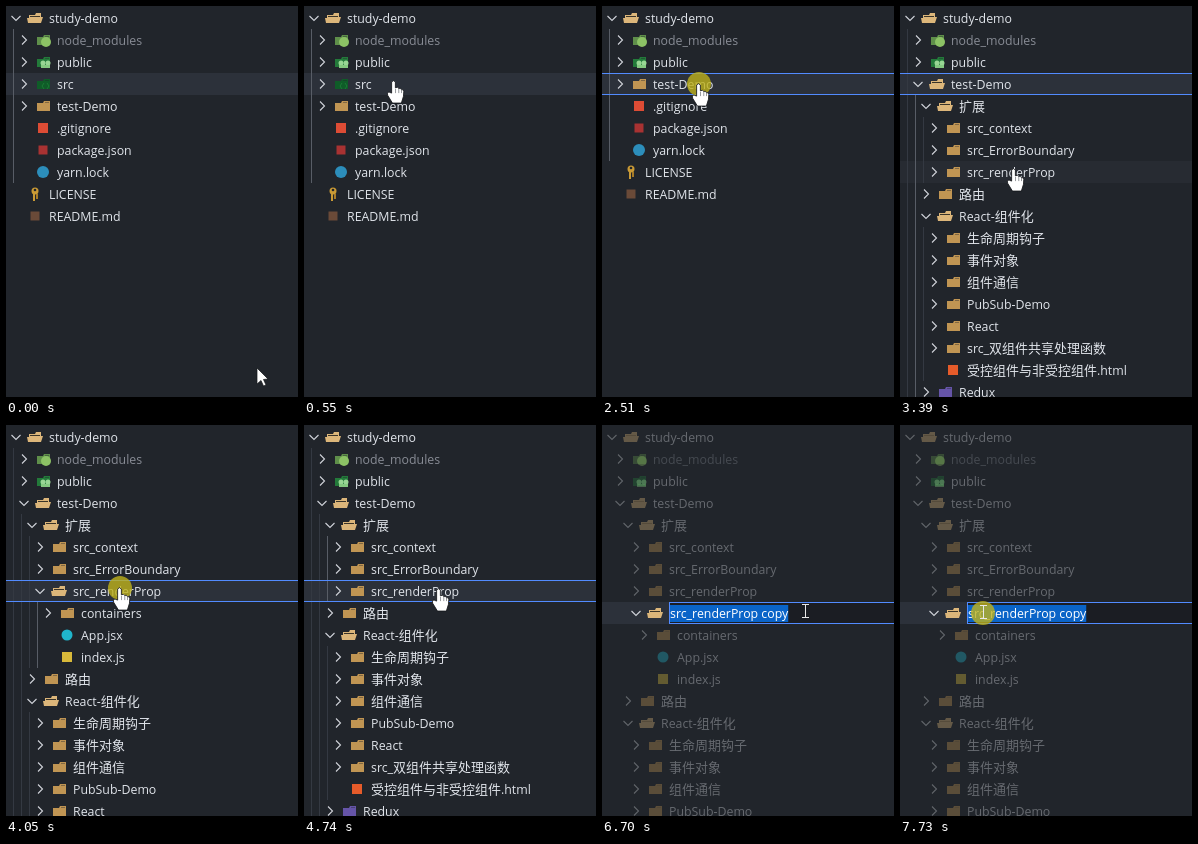
An HTML page with a canvas that plays this animation: 292 px wide and 391 px high, repeating every 8 s.

```html
<!DOCTYPE html>
<html lang="en">
<head>
<meta charset="utf-8">
<title>File explorer</title>
<style>
html, body { margin: 0; width: 100%; height: 100%; overflow: hidden; background: #21252b; }
canvas { display: block; width: 292px; height: 391px; }
</style>
</head>
<body>
<canvas id="stage"></canvas>
<script>
const W = 292, H = 391, ROW = 22, LOOP = 8000;
const canvas = document.getElementById('stage');
const ratio = window.devicePixelRatio || 1;
canvas.width = W * ratio;
canvas.height = H * ratio;
const c = canvas.getContext('2d');
c.scale(ratio, ratio);

const LATIN = "12.35px 'Open Sans', 'Noto Sans', sans-serif";
const CJK = "13px 'Noto Sans CJK SC', 'Noto Sans CJK', 'Noto Sans CJK JP', sans-serif";
const TAN = '#c09553', FOCUS = '#528bff';

// Times at which the tree changes
const T = {
  srcOpen: 820, srcShut: 1090, srcGone: 1740, demoOpen: 2640,
  propOpen: 3920, propShut: 4460, paste: 5550, copyOpen: 5890, rename: 6240
};
const between = (t, a, b) => t >= a && t < b;

// Pointer path: time, x, y of its hot spot
const PATH = [
  [0, 251, 362], [70, 251, 362], [550, 90, 74], [750, 90, 74], [950, 89, 76],
  [1150, 89, 76], [1230, 93, 31], [1410, 93, 31], [1480, 108, 38], [1740, 108, 38],
  [1880, 112, 44], [2160, 112, 46], [2440, 97, 77], [2640, 97, 77], [2920, 101, 92],
  [2990, 101, 93], [3390, 114, 162], [4390, 114, 162], [4740, 135, 163],
  [5270, 135, 163], [5750, 137, 183], [6100, 137, 183], [6630, 203, 186],
  [6770, 203, 186], [6840, 211, 187], [7040, 211, 187], [7440, 83, 187], [8000, 83, 187]
];
const CLICKS = [[750, 950], [2440, 2710], [3850, 4120], [4390, 4600], [5820, 6030], [7590, 8100]];

function pointer(t) {
  let i = 0;
  while (i < PATH.length - 2 && t >= PATH[i + 1][0]) i++;
  const [a, x0, y0] = PATH[i], [b, x1, y1] = PATH[i + 1];
  const p = Math.min(1, (t - a) / (b - a)), e = p * p * (3 - 2 * p);
  return [x0 + (x1 - x0) * e, y0 + (y1 - y0) * e];
}

function rowsAt(t) {
  const rows = [];
  const dir = (depth, name, open = false, icon = 'folder') => rows.push({ depth, name, open, icon, dir: true });
  const file = (depth, name, icon) => rows.push({ depth, name, icon });
  const parts = depth => {
    dir(depth, 'containers');
    file(depth, 'App.jsx', 'react');
    file(depth, 'index.js', 'js');
  };
  dir(0, 'study-demo', true);
  dir(1, 'node_modules', false, 'modules');
  dir(1, 'public', false, 'public');
  if (t < T.srcGone) {
    const open = between(t, T.srcOpen, T.srcShut);
    dir(1, 'src', open, 'src');
    if (open) {
      dir(2, 'components');
      dir(2, 'containers');
      file(2, 'App.jsx', 'react');
      file(2, 'index.js', 'js');
      file(2, 'setupProxy.js', 'js');
    }
  }
  const open = t >= T.demoOpen;
  dir(1, 'test-Demo', open);
  if (open) {
    const propOpen = between(t, T.propOpen, T.propShut);
    dir(2, '扩展', true);
    dir(3, 'src_context');
    dir(3, 'src_ErrorBoundary');
    dir(3, 'src_renderProp', propOpen);
    if (propOpen) parts(4);
    if (t >= T.paste) {
      dir(3, 'src_renderProp copy', t >= T.copyOpen);
      if (t >= T.copyOpen) parts(4);
    }
    dir(2, '路由');
    dir(2, 'React-组件化', true);
    for (const name of ['生命周期钩子', '事件对象', '组件通信', 'PubSub-Demo', 'React', 'src_双组件共享处理函数']) dir(3, name);
    file(3, '受控组件与非受控组件.html', 'html');
    dir(2, 'Redux', false, 'redux');
  }
  file(1, '.gitignore', 'git');
  file(1, 'package.json', 'npm');
  file(1, 'yarn.lock', 'yarn');
  file(0, 'LICENSE', 'key');
  file(0, 'README.md', 'md');
  return rows;
}

function box(x, y, w, h, fill) {
  c.fillStyle = fill;
  c.fillRect(x, y, w, h);
}

function disc(x, y, r, fill) {
  c.fillStyle = fill;
  c.beginPath();
  c.arc(x, y, r, 0, Math.PI * 2);
  c.fill();
}

function poly(points, fill, stroke, width = 1) {
  c.beginPath();
  points.forEach(([x, y]) => c.lineTo(x, y));
  if (fill) {
    c.closePath();
    c.fillStyle = fill;
    c.fill();
  }
  if (stroke) {
    c.strokeStyle = stroke;
    c.lineWidth = width;
    c.stroke();
  }
}

function label(str, x, y, fill) {
  c.fillStyle = fill;
  for (const run of str.match(/[\u4e00-\u9fff]+|[^\u4e00-\u9fff]+/g)) {
    c.font = run.charCodeAt(0) > 0x4dff ? CJK : LATIN;
    c.fillText(run, x, y);
    x += c.measureText(run).width;
  }
}

function folder(x, y, fill) {
  poly([[x - 6, y - 3], [x, y - 3], [x + 1, y - 5], [x + 7, y - 5], [x + 7, y + 5], [x - 6, y + 5]], fill);
  box(x + 2, y - 4, 4, 1, '#21252b66');
}

function openFolder(x, y) {
  poly([[x - 6, y - 3], [x, y - 3], [x + 1, y - 5], [x + 6, y - 5], [x + 6, y - 1], [x + 8, y - 1],
    [x + 6, y + 5], [x - 7, y + 5], [x - 8, y], [x - 6, y]], '#dcb67a');
  box(x - 5, y - 2, 10, 1, '#3a3428');
}

const square = (fill, size = 10) => (x, y) => box(x - size / 2, y - size / 2, size, size, fill);
const ICONS = {
  folder: (x, y) => folder(x, y, TAN),
  redux: (x, y) => folder(x, y, '#6554a8'),
  modules(x, y) {
    folder(x, y, '#5f8f4a');
    disc(x + 3, y + 2, 5, '#8cc265');
  },
  public(x, y) {
    folder(x, y, '#237a3a');
    disc(x, y + 1, 2.5, '#98d694');
    disc(x + 5, y + 1, 2.5, '#98d694');
    box(x - 2, y + 3, 9, 3, '#85c981');
  },
  src(x, y) {
    folder(x, y, '#0f5c28');
    poly([[x + 1, y - 1], [x - 1, y + 2], [x + 1, y + 5]], null, '#1b7a36');
    poly([[x + 4, y - 1], [x + 6, y + 2], [x + 4, y + 5]], null, '#1b7a36');
  },
  key(x, y) {
    disc(x, y - 3, 3.5, '#c99a35');
    disc(x, y - 4, 1.3, '#21252b');
    box(x - 2, y, 2, 7, '#c99a35');
    box(x + 1, y, 2, 5, '#a77b28');
  },
  git: square('#dd4c35', 10),
  npm: square('#a83232', 9),
  md: square('#6a4a38', 9),
  html: square('#e65b2a', 10),
  js: square('#d8b93a', 10),
  yarn: (x, y) => disc(x, y, 6, '#2c8ebb'),
  react: (x, y) => disc(x, y, 5.5, '#20b5cb')
};

function chevron(x, y, open) {
  const pts = open ? [[x - 4.5, y - 2], [x, y + 2.5], [x + 4.5, y - 2]]
    : [[x - 2, y - 4.5], [x + 2.5, y], [x - 2, y + 4.5]];
  poly(pts, null, '#d0d3d9', 1.1);
}

function guides(rows, focus) {
  const own = rows[focus];
  const level = own.open ? own.depth : own.depth - 1;
  let head = focus;
  while (rows[head].depth > level) head--;
  let end = head + 1;
  while (end < rows.length && rows[end].depth > level) end++;
  rows.forEach((row, i) => {
    for (let d = 0; d < row.depth; d++) {
      const active = d === level && i > head && i < end;
      box(7 + 8 * d, 1 + ROW * i, 1, ROW, active ? '#585d66' : '#343942');
    }
  });
}

function drawRow(row, i) {
  const y = 12 + ROW * i, x = 8 * row.depth;
  if (row.dir) chevron(x + 10, y, row.open);
  if (row.open && row.icon === 'folder') openFolder(x + 29, y);
  else ICONS[row.icon](x + 29, y);
  label(row.name, x + 43, y + 5, row.name === 'node_modules' ? '#888c95' : '#e0e4ea');
}

function renameBox(row, i) {
  const y = 1 + ROW * i;
  box(67, y, W - 67, ROW, FOCUS);
  box(68, y + 1, W - 68, ROW - 2, '#1b1d23');
  c.font = LATIN;
  box(68, y + 3, c.measureText(row.name).width, 17, '#0a64c8');
  label(row.name, 68, y + 16, '#ffffff');
}

function arrow(x, y) {
  poly([[x, y], [x, y + 16], [x + 4, y + 12.5], [x + 6.5, y + 18], [x + 9, y + 17],
    [x + 6.5, y + 11.5], [x + 11, y + 11]], '#ffffff', '#15171b', 0.7);
}

function hand(x, y) {
  c.save();
  c.translate(x - 0.5, y + 0.5);
  c.scale(1.05, 1.05);
  c.beginPath();
  c.moveTo(-1.8, 12);
  c.lineTo(-1.8, 1.5);
  c.quadraticCurveTo(0, -1.2, 1.8, 1.5);
  c.lineTo(1.8, 7);
  c.quadraticCurveTo(4, 5.6, 5, 7.6);
  c.quadraticCurveTo(7, 6.6, 7.6, 8.8);
  c.quadraticCurveTo(9.8, 8, 9.8, 10.5);
  c.lineTo(9.5, 15);
  c.lineTo(7.5, 21.5);
  c.lineTo(-1, 21.5);
  c.lineTo(-5.6, 14);
  c.quadraticCurveTo(-6.3, 10.6, -3.8, 11.2);
  c.closePath();
  c.fillStyle = '#ffffff';
  c.fill();
  c.strokeStyle = '#15171b';
  c.lineWidth = 0.8;
  c.stroke();
  for (const px of [1.8, 4.8, 7.3]) box(px, 8, 0.6, 4, '#5a5d63');
  c.restore();
}

function beam(x, y) {
  x = Math.round(x);
  y = Math.round(y);
  box(x, y - 7, 1, 14, '#e8e8e8');
  for (const dy of [-7, 6]) box(x - 3, y + dy, 7, 1, '#e8e8e8');
}

function draw(t) {
  const rows = rowsAt(t);
  const renaming = t >= T.rename;
  const selected = t < T.srcGone ? 'src' : t < T.propOpen ? 'test-Demo'
    : t < T.paste ? 'src_renderProp' : 'src_renderProp copy';
  const focus = rows.findIndex(r => r.name === selected);
  const [x, y] = pointer(t);
  const hover = Math.floor((y - 1) / ROW);

  box(0, 0, W, H, '#21252b');
  if (!renaming && hover < rows.length) box(0, 1 + ROW * hover, W, ROW, '#272b32');
  const top = 1 + ROW * focus;
  box(0, top, W, ROW, '#2c313a');
  if (!renaming) guides(rows, focus);
  if (t >= 750 && !renaming) {
    box(0, top, W, 1, FOCUS);
    box(0, top + ROW - 1, W, 1, FOCUS);
  }

  rows.forEach((row, i) => {
    if (12 + ROW * i > H + 12) return;
    c.globalAlpha = renaming && i !== focus ? 0.36 : 1;
    drawRow(row, i);
  });
  c.globalAlpha = 1;
  if (renaming) renameBox(rows[focus], focus);

  if (CLICKS.some(([a, b]) => between(t, a, b))) disc(x, y + 1, 12, 'rgba(190,178,28,0.8)');
  if (renaming) beam(x, y);
  else if (hover < rows.length) hand(x, y);
  else arrow(x, y);
}

const start = performance.now();
function tick() {
  draw((performance.now() - start) % LOOP);
  requestAnimationFrame(tick);
}
tick();
</script>
</body>
</html>
```
